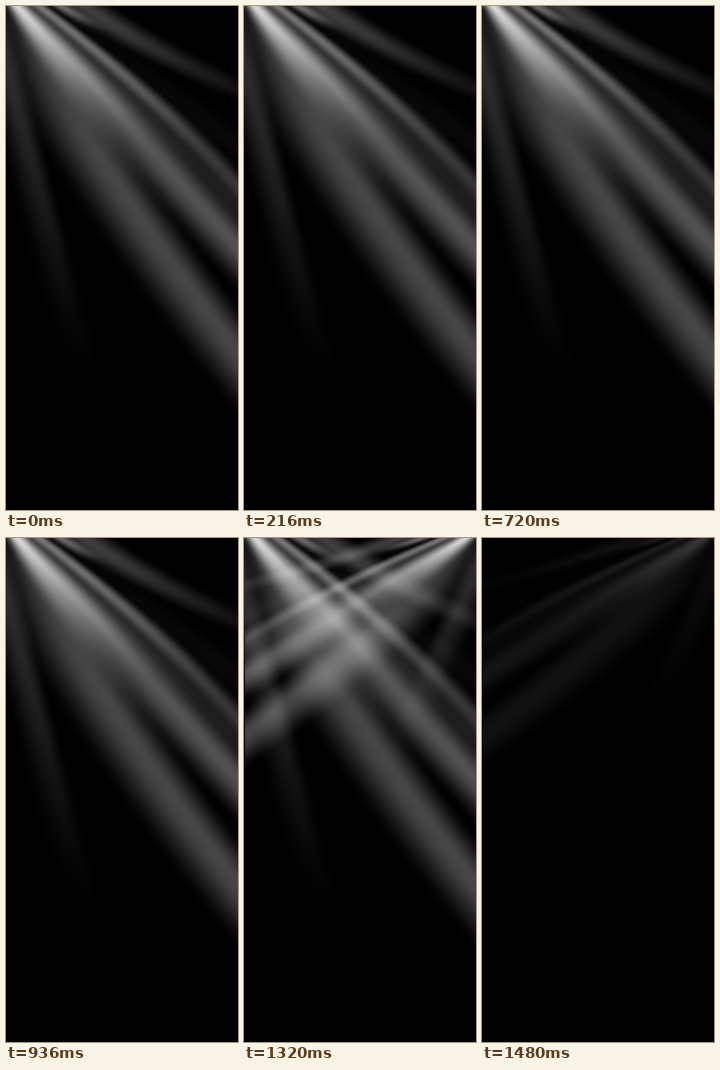
An HTML page with a canvas for the animation above (1840 ms loop, 508 px wide and 1101 px high).

```html
<!DOCTYPE html>
<html>
<head>
<meta charset="utf-8">
<style>
  html, body { margin: 0; height: 100%; overflow: hidden; background: #000; }
  canvas { display: block; }
</style>
</head>
<body>
<canvas id="stage" width="508" height="1101"></canvas>
<script>
const W = 508, H = 1101, LOOP = 1840;
const ctx = document.getElementById('stage').getContext('2d');

const mix = (a, b, k) => a + (b - a) * k;
const smooth = k => k * k * (3 - 2 * k);
const easeOut = k => 1 - (1 - k) ** 2;

// A ray leaves the top edge at x, opens from its mouth to soft left and right
// flanks, and settles from its near to its far brightness over its reach.
function ray({ x, slope, bend = 0, mouth = 30, left, right = left, near, far = 0, reach }) {
  return y => {
    const k = Math.min(y / reach, 1);
    const centre = x + slope * y + bend * y * y;
    const leftWidth = mix(mouth, left, easeOut(k));
    const rightWidth = mix(mouth, right, easeOut(k));
    const level = mix(near, far, smooth(k));
    return px => {
      const d = px - centre;
      const t = Math.abs(d) / (d < 0 ? leftWidth : rightWidth);
      return t < 1 ? level * smooth(1 - t) : 0;
    };
  };
}

const rays = [
  ray({ x: 24, slope: 0.92, left: 102, right: 68, near: 160, far: 80, reach: 320 }),
  ray({ x: 20, slope: 0.506, bend: 0.000186, left: 125, right: 86, near: 55, far: 70, reach: 320 }),
  ray({ x: 75, slope: 1.298, bend: -0.00048, mouth: 24, left: 44, near: 110, far: 42, reach: 400 }),
  ray({ x: 50, slope: 1.04, left: 85, near: 70, far: 30, reach: 400 }),
  ray({ x: 170, slope: 1.39, bend: 0.0024, mouth: 75, left: 72, right: 85, near: 62, far: 12, reach: 230 }),
  ray({ x: 118, slope: 1.6, left: 36, near: 85, reach: 60 }),
  ray({ x: -35, slope: 0.27, mouth: 45, left: 74, right: 36, near: 46, reach: 915 }),
  ray({ x: 110, slope: 1.3, left: 80, near: 4, far: 8, reach: 300 })
];

function paintBeam() {
  const canvas = document.createElement('canvas');
  canvas.width = W;
  canvas.height = H;
  const g = canvas.getContext('2d'), image = g.createImageData(W, H);
  image.data.fill(255);
  for (let y = 0, i = 3; y < H; y++) {
    const row = rays.map(at => at(y));
    for (let x = 0; x < W; x++, i += 4) {
      image.data[i] = row.reduce((sum, glow) => sum + glow(x), 0);
    }
  }
  g.putImageData(image, 0, 0);
  return canvas;
}

const beam = paintBeam();

const cues = [
  { start: 0, left: 1, right: 0 },
  { start: 360, left: 0, right: 0.5 },
  { start: 720, left: 1, right: 0 },
  { start: 1080, left: 1, right: 1 },
  { start: 1480, left: 0, right: 0.25 }
];

function drawLamp(power, ...transform) {
  ctx.setTransform(...transform);
  ctx.globalAlpha = power;
  ctx.drawImage(beam, 0, 0);
}

function frame() {
  const t = performance.now() % LOOP;
  const { left, right } = cues.findLast(cue => cue.start <= t);
  ctx.setTransform(1, 0, 0, 1, 0, 0);
  ctx.globalAlpha = 1;
  ctx.fillStyle = '#000';
  ctx.fillRect(0, 0, W, H);
  drawLamp(left, 1, 0, 0, 1, 0, 0);
  drawLamp(right, -1, 0, 0, 0.566, 510, 0);
  requestAnimationFrame(frame);
}
frame();
</script>
</body>
</html>
```
